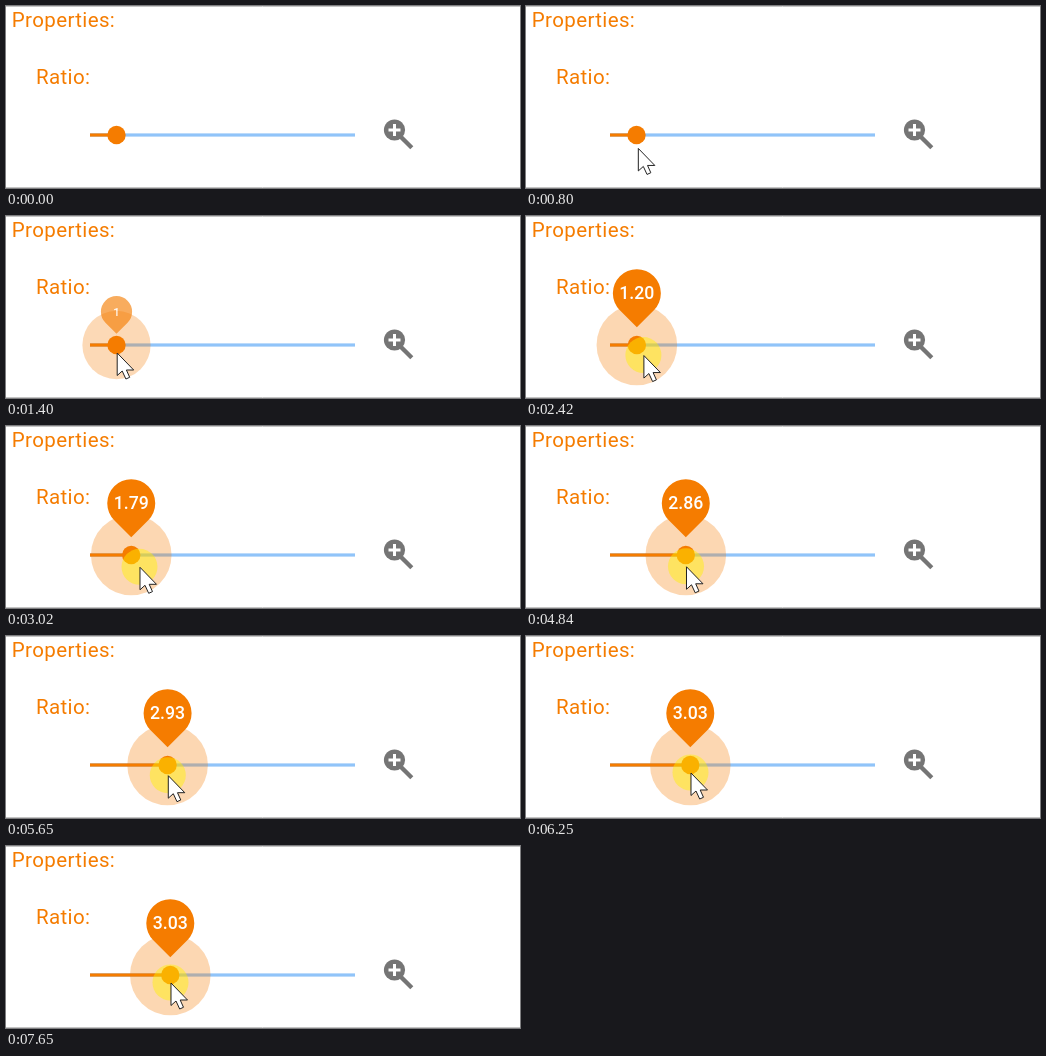
An HTML page for the animation above (8000 ms loop, 514 by 182 pixels).

```html
<!DOCTYPE html>
<html lang="en">
<head>
<meta charset="utf-8">
<title>Ratio slider</title>
<style>
  html, body { margin: 0; width: 100%; height: 100%; overflow: hidden; background: #fff; }
  svg { display: block; width: 514px; height: 182px; font-family: Roboto, sans-serif; }
  .head { font-size: 20.5px; letter-spacing: .37px; fill: #f57c00; }
  .accent { fill: #f57c00; }
  #value { font-size: 17.7px; font-weight: 500; fill: #fff; text-anchor: middle; }
</style>
</head>
<body>
<svg viewBox="0 0 514 182">
  <path d="M0 .5H514M0 181.5H514" stroke="#c4c4c4"/>
  <text class="head" x="5.8" y="21">Properties:</text>
  <text class="head" x="30" y="78">Ratio:</text>

  <g fill="none" stroke="#757575">
    <path d="M394 130L405.8 141.7" stroke-width="4.4"/>
    <circle cx="388.5" cy="124" r="10.6" fill="#757575" stroke="none"/>
    <path d="M382.5 124h12M388.5 118v12" stroke="#fff" stroke-width="3"/>
  </g>

  <rect x="84" y="127.4" width="265" height="3.2" fill="#90c4f9"/>
  <rect id="fill" class="accent" x="84" y="127.4" height="3.2"/>
  <circle id="ring" class="accent" cy="129"/>
  <circle id="thumb" class="accent" cy="129" r="9.2"/>
  <g id="bubble">
    <path class="accent" d="M0 34L-17 17A24 24 0 1 1 17 17Z"/>
    <text id="value" y="6.2"></text>
  </g>
  <circle id="press" r="18" fill="#fff000" fill-opacity=".46"/>
  <path id="cursor" d="M0 0V22.5L5 18L8.7 26L12.5 24.3L9.2 17H16.5Z" fill="#fff" stroke="#222"/>
</svg>
<script>
const LOOP = 8000, TRACK = 84, UNIT = 26.5, DRAG = 2220;
const ids = ["fill", "ring", "thumb", "bubble", "value", "press", "cursor"];
const el = Object.fromEntries(ids.map(id => [id, document.getElementById(id)]));

// Key points of the drag: time, value
const keys = [[DRAG, 1], [3020, 1.79], [3820, 2.69], [4220, 2.69], [4820, 2.86], [5220, 2.86], [6220, 3.03]];

const clamp = p => Math.min(1, Math.max(0, p));
const ease = (t, from, time) => {
  const p = clamp((t - from) / time);
  return p * p * (3 - 2 * p);
};
const set = (node, attrs) => {
  for (const key in attrs) node.setAttribute(key, attrs[key]);
};

function valueAt(t) {
  return keys.slice(1).reduce((sum, [time, value], i) => {
    const [prevTime, prevValue] = keys[i];
    return sum + (value - prevValue) * clamp((t - prevTime) / (time - prevTime));
  }, keys[0][1]);
}

// The picture moves five times a second; the drag begins a little off the beat.
function snap(t) {
  const phase = t < DRAG ? 0 : DRAG % 200;
  return Math.floor((t - phase) / 200) * 200 + phase;
}

// The pointer rises from the bottom edge, then leads the thumb while dragging.
function pointer(t, goal, lag) {
  const left = (1 - clamp((t - 200) / 1000)) ** 2;
  const sag = Math.sqrt(Math.sin(Math.PI * clamp((t - DRAG) / 4000)));
  return [goal + .7 + 7 * left + .3 * lag, 137 + 34 * left + 4 * sag + .2 * lag];
}

function draw(time) {
  const t = snap(time);
  const value = valueAt(t);
  const goal = TRACK + UNIT * value;
  const rest = TRACK + UNIT;
  const x = rest + (goal - rest) * ease(t, DRAG, 1250);
  const [px, py] = pointer(t, goal, goal - x);

  const grow = ease(t, 1080, 720);
  const glow = clamp(grow * 2.3);
  const radius = 25.5 + 9 * glow + 5.8 * ease(t, DRAG - 200, 400);
  const scale = .4 + .6 * grow;
  const y = 77.2 + 52.8 * (1 - scale);

  set(el.fill, { width: x - TRACK });
  set(el.thumb, { cx: x });
  set(el.ring, { cx: x, r: radius, opacity: .3 * glow });
  set(el.bubble, { transform: `translate(${x} ${y}) scale(${scale})`, opacity: clamp(grow * 1.5) });
  el.value.textContent = value === 1 ? "1" : value.toFixed(2);
  set(el.press, { cx: px - .5, cy: py - .5, opacity: t < DRAG ? 0 : 1 });
  set(el.cursor, { transform: `translate(${px} ${py})`, opacity: t < 200 ? 0 : 1 });
}

const start = performance.now();
function tick() {
  draw((performance.now() - start) % LOOP);
  requestAnimationFrame(tick);
}
tick();
</script>
</body>
</html>
```
